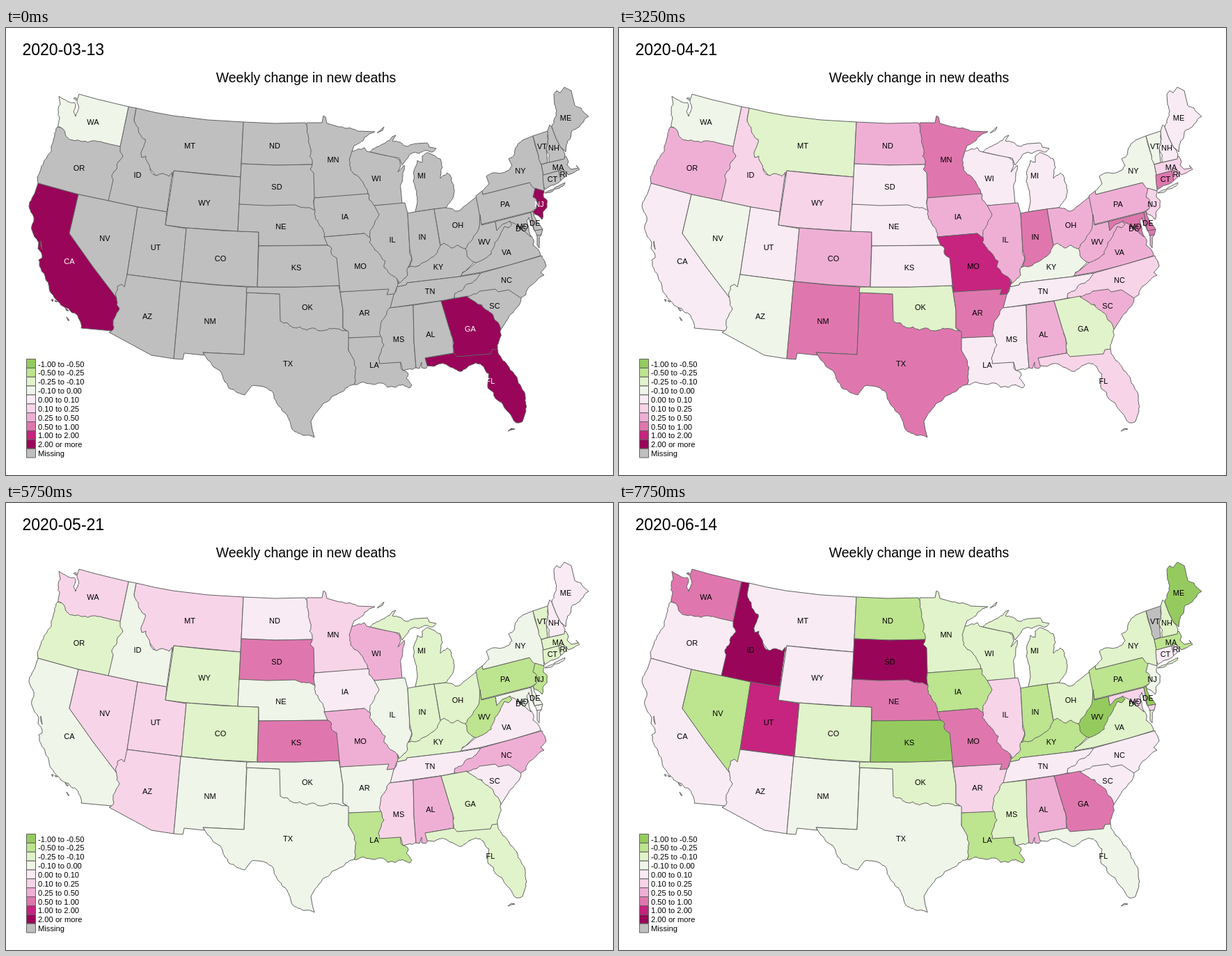
Animation of 872 by 642 pixels, one loop 8000 ms. Source, as an HTML page with a canvas:

```html
<!DOCTYPE html>
<html lang="en">
<head>
<meta charset="utf-8">
<title>Weekly change in new deaths</title>
<style>
html, body { margin: 0; width: 100%; height: 100%; overflow: hidden; background: #fff; }
canvas { display: block; }
</style>
</head>
<body>
<canvas id="map" width="872" height="642"></canvas>
<script>
const ctx = document.getElementById('map').getContext('2d');
const FONT = '"Liberation Sans", Arial, sans-serif';
const STEP = 250, STEPS = 32;
const KEY_STEPS = [0, 6, 11, 16, 20, 26, 31];
const MISSING = 10;
const CLASSES = [
  ['#95cb5e', '-1.00 to -0.50'], ['#bde48f', '-0.50 to -0.25'],
  ['#e1f3ca', '-0.25 to -0.10'], ['#eff5e8', '-0.10 to 0.00'],
  ['#f9ebf3', '0.00 to 0.10'], ['#f8d4e8', '0.10 to 0.25'],
  ['#efafd5', '0.25 to 0.50'], ['#df77ae', '0.50 to 1.00'],
  ['#c6247e', '1.00 to 2.00'], ['#990559', '2.00 or more'],
  ['#bfbfbf', 'Missing']
];
const states = [];

const noise = (x, y) => {
  const v = Math.sin(x * 12.9898 + y * 78.233) * 43758.5453;
  return v - Math.floor(v);
};

// Midpoint displacement; the result is the same from either end.
function roughLine(path, a, b) {
  const flip = a[0] > b[0] || (a[0] === b[0] && a[1] > b[1]) ? -1 : 1;
  const dx = (b[0] - a[0]) * flip, dy = (b[1] - a[1]) * flip;
  if (Math.hypot(dx, dy) < 4.5) return path.lineTo(b[0], b[1]);
  const mx = (a[0] + b[0]) / 2, my = (a[1] + b[1]) / 2;
  const k = (noise(mx, my) - 0.5) * 0.3;
  const mid = [mx - dy * k, my + dx * k];
  roughLine(path, a, mid);
  roughLine(path, mid, b);
}

// "x,y" is a straight step, "~x,y" a ragged one, "/" starts another ring.
function outline(text) {
  const path = new Path2D();
  for (const ring of text.split('/')) {
    let last = null;
    for (const word of ring.trim().split(/\s+/)) {
      const point = word.replace('~', '').split(',').map(Number);
      if (!last) path.moveTo(...point);
      else if (word[0] === '~') roughLine(path, last, point);
      else path.lineTo(...point);
      last = point;
    }
    path.closePath();
  }
  return path;
}

// Later states cover the hidden edges of earlier ones.
function state(name, keys, x, y, shape) {
  const levels = [...keys].map(c => c === 'x' ? MISSING : +c);
  states.push({ name, levels, x, y, path: outline(shape) });
}

state('MT', 'x940094', 264, 169, '187,115 213,121 240,126 290,132 341,135 337,214 241,205 239,213 215,212 190,180 184,131');
state('OR', 'x674214', 105, 201, '74,142 ~70,155 ~65,170 ~58,187 ~50,203 ~45,214 46,223 75,231 104,239 147,248 172,210 172,166 125,155');
state('ID', 'x990419', 189, 211, '176,113 187,115 184,131 ~190,143 ~192,152 ~200,160 ~196,174 ~195,186 ~201,184 ~206,197 ~211,210 ~217,212 ~224,209 ~234,213 239,207 231,264 189,257 147,248 154,218 ~152,211 ~159,202 ~168,185 ~164,178 164,170');
state('WA', '3717647', 125, 135, '105,95 130,102 155,108 176,113 164,170 150,167 138,164 ~125,162 ~110,163 ~96,161 ~88,157 ~84,148 ~75,142 ~77,130 ~75,119 ~78,110 76,98 82,102 ~89,106 ~98,107 ~100,112 ~97,120 ~100,127 ~103,120 ~104,111 ~102,104 / 97,101 101,100 101,104');
state('CA', '9962424', 91, 335, '46,223 75,231 104,239 91,295 125,343 160,389 168,398 163,428 152,435 108,431 ~107,422 ~101,411 ~95,409 ~90,403 ~84,401 ~75,393 ~65,381 ~62,371 ~57,361 ~50,345 ~47,333 52,330 ~46,317 47,308 ~41,300 ~37,284 ~40,272 ~35,262 ~34,250 ~41,238 / 50,306 50,312 52,318 51,312 / 65,390 68,390 67,393 / 70,391 74,393 71,393 / 85,402 90,406 87,406 / 87,415 91,420 89,420');
state('NV', 'x825541', 142, 302, '104,239 147,248 189,257 174,354 175,370 160,389 125,343 91,295');
state('UT', 'x952728', 215, 315, '189,257 231,264 229,283 259,288 252,364 174,354');
state('AZ', 'x951724', 203, 414, '174,354 251,364 241,475 209,470 148,437 152,435 ~155,430 ~154,423 ~158,412 ~163,403 ~159,391 ~160,371 166,368 170,372');
state('WY', 'xx90x24', 285, 251, '241,205 288,210 337,214 333,292 259,287 229,283');
state('CO', 'x967302', 308, 331, '259,287 310,291 363,293 361,372 306,369 252,364');
state('NM', 'x985423', 293, 421, '251,364 300,369 346,372 342,469 283,466 285,470 256,467 254,476 241,475');
state('TX', 'x976413', 405, 482, '346,380 393,382 410,410 480,425 493,436 492,463 510,490 500,512 ~488,517 ~476,526 ~463,536 ~450,547 ~443,556 438,565 440,577 443,588 ~430,585 ~411,576 ~404,556 ~392,543 ~385,528 ~375,517 ~363,514 ~352,515 343,527 ~333,524 ~320,517 ~314,508 ~311,499 ~300,488 ~290,477 283,466 342,469');
state('OK', 'x922242', 433, 401, '346,372 412,372 478,370 480,379 484,405 484,431 ~490,435 ~476,432 ~465,431 ~455,435 ~442,431 ~432,434 ~422,429 ~412,430 ~405,424 ~394,421 393,382 345,380');
state('LA', 'x952111', 529, 484, '492,445 538,442 548,455 542,475 567,480 567,488 ~578,497 ~575,503 ~583,513 580,517 ~570,512 ~560,516 ~548,516 ~540,510 ~528,512 ~515,509 ~500,512 ~501,500 ~503,488 ~500,477 492,463');
state('NE', 'x943327', 395, 285, '335,253 415,248 450,255 462,290 462,312 363,313 363,293 333,292');
state('KS', 'x961770', 417, 344, '363,313 462,312 482,320 482,370 478,370 420,372 361,372');
state('MN', 'x986452', 470, 189, '432,136 454,136 456,126 459,128 461,137 475,141 ~490,144 ~505,148 530,149 ~515,157 ~500,169 497,177 510,190 524,225 519,239 443,244 432,190');
state('ND', 'x991081', 386, 169, '341,135 386,137 430,136 ~434,155 ~437,172 ~440,196 388,197 338,195');
state('SD', 'x009589', 389, 228, '338,195 388,197 440,196 ~437,203 442,208 443,244 ~442,252 ~444,262 ~436,258 ~425,258 415,254 375,255 335,253');
state('IA', 'x967521', 487, 271, '443,244 519,238 537,245 540,285 521,302 515,295 457,300 ~450,282 ~444,262 ~442,252');
state('AR', 'x978065', 515, 409, '480,379 550,374 564,382 553,425 538,443 492,445 492,436 484,431 484,405');
state('MO', 'x987847', 509, 342, '457,300 515,295 521,300 545,310 556,340 564,370 ~560,375 ~557,382 547,383 550,375 480,379 475,330 ~467,322 ~468,317 ~462,312');
state('WI', 'x853572', 532, 216, '497,177 ~515,172 518,177 545,183 ~560,186 ~566,190 ~567,198 563,207 572,197 ~570,212 ~567,230 569,252 529,255 ~522,247 ~519,233 ~507,214 ~495,204 ~493,190');
state('MI', 'x952212', 597, 212, '588,264 615,260 632,258 ~638,250 ~643,240 ~643,230 ~640,215 ~634,208 ~628,212 624,216 ~625,208 ~627,200 ~624,188 ~615,183 606,179 ~598,184 598,193 ~591,190 ~586,205 ~585,220 ~590,235 ~591,250 / 523,178 ~532,171 ~545,165 ~555,156 560,154 555,162 ~566,164 ~578,170 ~590,166 605,165 ~608,171 618,173 ~613,178 ~603,176 ~594,180 ~583,180 ~575,189 569,197 565,187 545,183 / 533,151 543,142 541,147');
state('VA', 'x984262', 719, 322, '648,357 682,351 725,340 768,327 ~765,319 ~757,312 ~758,304 ~751,296 742,285 728,275 716,277 695,300 680,330 675,337 663,347 / 763,298 769,296 ~766,316 763,312');
state('KY', 'x842401', 621, 343, '562,372 575,369 576,366 652,357 ~662,347 672,337 674,322 650,305 620,305 570,340');
state('IL', 'x974425', 555, 304, '529,255 573,251 577,266 580,318 ~583,330 ~578,343 ~577,355 ~570,362 ~564,367 ~558,357 ~550,352 ~543,344 ~545,335 ~538,327 ~530,319 ~522,308 ~523,295 ~530,278 ~536,268');
state('IN', 'x977131', 598, 300, '577,266 588,264 615,260 624,313 ~620,322 ~607,333 ~599,337 ~588,343 ~578,344 ~583,330 580,318');
state('OH', 'x965212', 649, 283, '615,260 632,258 ~645,263 ~660,255 675,243 688,265 684,300 660,317 ~650,312 ~640,316 ~630,309 624,312');
state('NC', 'x964574', 719, 362, '682,352 725,340 770,327 ~774,335 776,342 ~768,351 773,355 ~762,363 ~752,371 ~747,383 739,388 700,385 644,388 643,375');
state('TN', 'x944444', 609, 378, '552,402 630,391 644,388 ~645,381 ~655,377 ~665,367 ~675,362 682,352 652,357 576,366 575,369 561,372 ~557,383');
state('MS', 'x952542', 564, 447, '551,402 585,398 586,450 589,488 ~578,490 570,492 567,480 536,482 ~535,475 ~538,467 ~543,455 ~538,442 ~540,420 ~547,407');
state('AL', 'x965756', 610, 440, '585,398 625,392 637,432 ~642,448 643,467 602,474 ~607,484 603,489 597,488 597,480 594,489 589,488 586,450');
state('FL', '9963223', 696, 507, '602,474 643,467 690,455 706,461 ~714,478 ~725,492 ~736,510 ~746,530 ~747,550 742,565 ~733,567 ~723,553 ~714,541 ~703,532 ~700,523 693,518 ~694,497 ~686,486 ~675,481 ~665,485 ~655,493 ~645,490 ~632,483 ~615,486 605,485 / 721,579 726,575 731,576 726,577');
state('GA', '9822127', 667, 432, '625,392 663,385 715,420 711,433 ~708,450 ~706,461 698,462 696,468 648,472 643,466 ~642,447 637,432');
state('SC', 'x958164', 702, 399, '662,386 ~680,378 703,375 707,379 722,376 740,388 ~733,402 ~722,416 711,433 ~703,420 ~690,405 ~675,394');
state('PA', 'x965111', 717, 253, '675,241 684,234 685,239 752,222 770,235 769,255 754,264 683,282');
state('WV', 'x982100', 687, 307, '681,268 683,283 703,278 705,291 ~713,281 ~722,277 727,282 722,287 716,285 ~711,294 ~702,308 ~697,325 ~685,333 ~675,337 ~664,330 ~660,317 ~663,311 ~672,299 ~680,284');
state('MD', 'x985335', 742, 285, '703,278 754,265 759,291 771,289 769,297 ~762,298 ~758,289 ~753,280 751,272 ~748,277 ~750,284 ~751,291 754,300 ~748,295 ~741,290 ~734,284 ~724,277 ~713,282 705,291');
state('DE', 'x976330', 760, 280, '754,265 757,263 ~759,271 ~765,280 771,289 759,291');
state('NY', 'x951412', 739, 205, '685,239 684,234 ~694,224 690,213 ~700,208 ~718,206 ~727,198 722,188 ~734,170 ~742,161 757,155 760,168 764,180 769,196 772,211 773,234 ~756,228 752,222 / 774,237 ~789,229 803,222 ~795,230 ~782,236');
state('NJ', '9963113', 766, 253, '760,230 773,234 ~772,243 777,247 ~777,258 ~770,275 ~764,269 ~757,264 ~764,252 ~757,243');
state('CT', 'x993214', 785, 217, '771,211 794,205 797,219 ~783,226 774,232 772,225');
state('RI', 'x991224', 801, 210, '794,205 801,203 ~805,212 797,219');
state('MA', 'x981221', 793, 200, '769,196 780,193 798,189 804,184 ~808,192 806,197 812,203 822,201 819,197 824,203 ~815,208 808,211 801,203 772,211');
state('VT', 'x24204x', 770, 170, '757,155 778,148 ~779,160 ~776,172 778,193 769,196 ~764,180');
state('NH', 'x845712', 787, 172, '778,148 781,139 784,142 790,158 797,172 ~803,181 802,188 780,193 ~776,172 ~779,160');
state('ME', 'x961070', 804, 129, '784,142 ~788,130 ~788,110 787,95 791,90 796,93 802,85 812,90 817,111 ~826,115 ~830,121 837,127 ~826,138 ~820,144 ~812,150 ~811,158 ~805,168 804,178 ~797,172 790,158');
state('DC', 'xxxxxxx', 740, 288, '739,285 742,287 740,290');

function levelAt(s, step) {
  let i = KEY_STEPS.length - 1;
  while (KEY_STEPS[i] > step) i--;
  const from = s.levels[i], to = s.levels[i + 1];
  if (step === KEY_STEPS[i]) return from;
  const part = (step - KEY_STEPS[i]) / (KEY_STEPS[i + 1] - KEY_STEPS[i]);
  if (from === MISSING || to === MISSING)
    return part > 0.1 + 0.75 * noise(s.x, s.y) ? to : from;
  return Math.round(from + (to - from) * part);
}

function write(text, x, y, size, align = 'left', color = '#000') {
  ctx.font = size + 'px ' + FONT;
  ctx.textAlign = align;
  ctx.fillStyle = color;
  ctx.fillText(text, x, y);
}

function drawLegend() {
  const height = 12.87;
  CLASSES.forEach(([color, label], i) => {
    const y = 475.5 + i * height;
    ctx.fillStyle = color;
    ctx.fillRect(29.5, y, 13, height);
    ctx.strokeRect(29.5, y, 13, height);
    write(label, 46, y + 11, 11.2);
  });
}

function draw(step) {
  ctx.fillStyle = '#fff';
  ctx.fillRect(0, 0, 872, 642);
  ctx.strokeStyle = '#626262';
  ctx.lineWidth = 1;
  ctx.lineJoin = 'round';
  const date = new Date(Date.UTC(2020, 2, 13 + 3 * step));
  write(date.toISOString().slice(0, 10), 23.5, 39, 23);
  write('Weekly change in new deaths', 431, 78, 19.5, 'center');

  const levels = states.map(s => levelAt(s, step));
  states.forEach((s, i) => {
    ctx.fillStyle = CLASSES[levels[i]][0];
    ctx.fill(s.path);
    ctx.stroke(s.path);
  });
  states.forEach((s, i) => {
    const light = levels[i] === 9 && step < 3;
    write(s.name, s.x, s.y + 4, 11, 'center', light ? '#fff' : '#000');
  });
  drawLegend();
}

let shown = -1;
function tick() {
  const step = Math.floor(performance.now() / STEP) % STEPS;
  if (step !== shown) draw(shown = step);
  requestAnimationFrame(tick);
}
tick();
</script>
</body>
</html>
```
